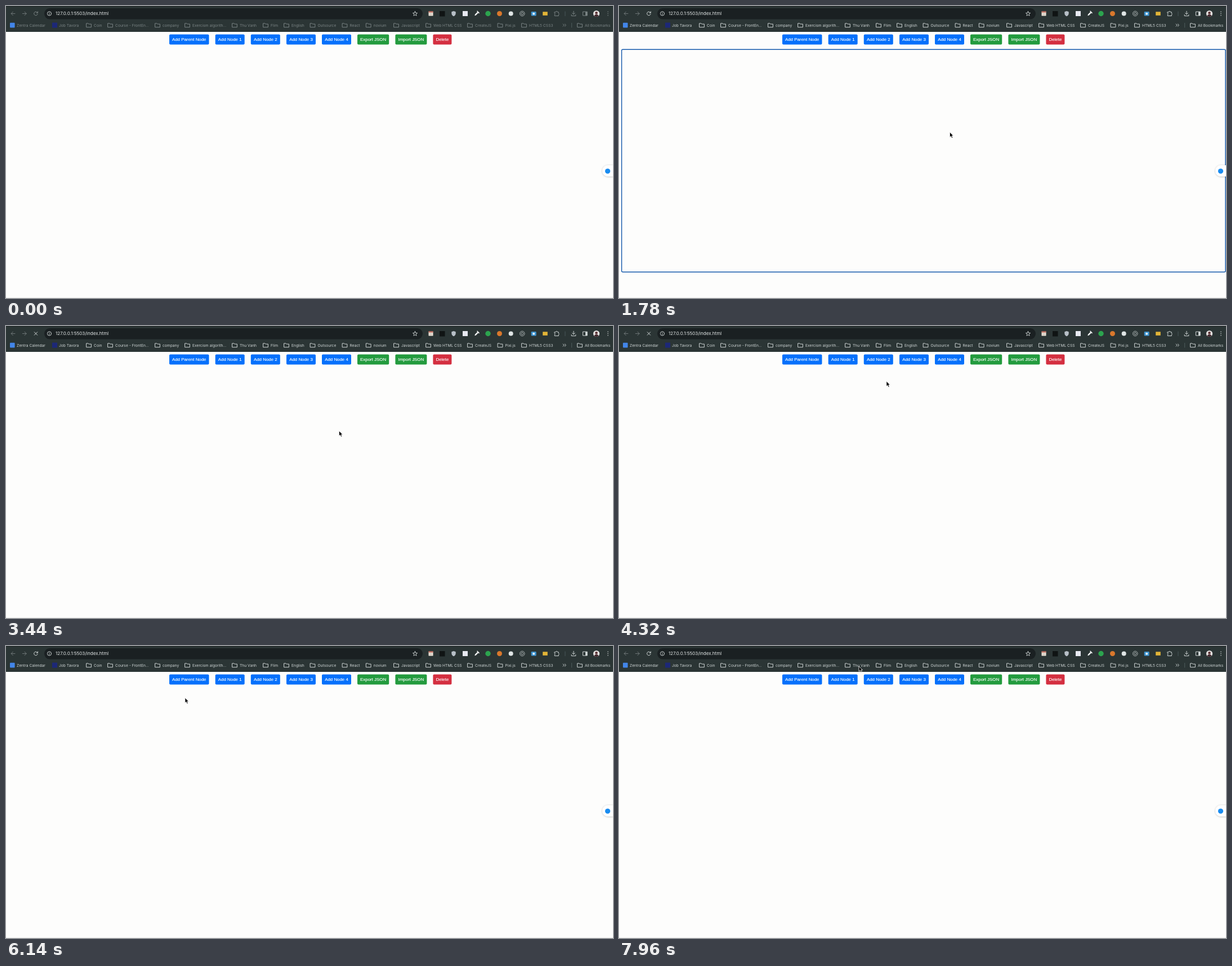
An HTML page for the animation above (8 s loop, 1078 by 519 pixels).

```html
<!DOCTYPE html>
<html lang="en">
<head>
<meta charset="utf-8">
<title>Node editor in a browser</title>
<style>
  html, body { margin: 0; width: 100%; height: 100%; overflow: hidden; background: #fdfdfc; }
  svg { display: block; width: 100%; height: 100%; }
  .ui { font-family: Inter, Roboto, sans-serif; }
  .marks text { font-size: 6.7px; fill: currentColor; }
  .line { fill: none; stroke: currentColor; stroke-width: 1; stroke-linecap: round; stroke-linejoin: round; }
  .btn text { font: 7.9px "Liberation Sans", Arial, sans-serif; fill: #fff; stroke: #fff; stroke-width: .15; text-anchor: middle; }
</style>
</head>
<body>
<svg viewBox="0 0 1078 519" preserveAspectRatio="none">
  <defs>
    <filter id="soft" x="-40%" y="-40%" width="180%" height="180%">
      <feDropShadow dx="0" dy="0.5" stdDeviation="1.6" flood-color="#000" flood-opacity=".28"/>
    </filter>
    <clipPath id="face"><circle cx="1048.5" cy="13.5" r="5.6"/></clipPath>
  </defs>

  <rect width="1078" height="519" fill="#fdfdfc"/>
  <rect y="518" width="1078" height="1" fill="#f0f0f0"/>
  <rect id="focus" x="4.7" y="77.2" width="1072.4" height="395.6" rx="2" fill="none" stroke="#1459ab" stroke-width="1.4"/>
  <g id="buttons" class="btn"></g>

  <g id="widget">
    <path d="M1078 283H1069a10 10 0 0 0 0 20H1078Z" fill="#fff" filter="url(#soft)"/>
    <circle cx="1068.5" cy="293.5" r="4.6" fill="#1a8cf0"/>
  </g>

  <rect width="1078" height="46" fill="#2b3535"/>
  <rect width="1078" height="1" fill="#1c2323"/>
  <rect x="68" y="4" width="672" height="19.5" rx="9.7" fill="#1a2022"/>

  <g class="line" color="#6f7778">
    <path d="M16 13.5H9.3M12.3 10.3L9.1 13.5L12.3 16.7"/>
    <path d="M29.3 13.5H36M33 10.3L36.2 13.5L33 16.7"/>
  </g>

  <g class="line" color="#d3d8d8">
    <circle cx="77" cy="13.5" r="3.6" stroke-width=".9"/>
    <path d="M77 13.3V15.3M77 11.7V11.8" stroke-width=".9"/>
    <path id="star" stroke-width=".9"/>
  </g>
  <text class="ui" x="88" y="16.4" font-size="8" fill="#e3e7e7">127.0.0.1:5503/index.html</text>

  <g id="extensions">
    <rect x="750.5" y="9.5" width="8" height="8" rx=".6" fill="#eee7dc"/>
    <rect x="750.5" y="9.5" width="8" height="2" fill="#b9584a"/>
    <path d="M752 13.5H757M752 15.5H757" stroke="#b3aaa0" stroke-width=".7"/>
    <rect x="770" y="9" width="9.5" height="9.5" fill="#101414"/>
    <path d="M795 9L798.7 10.3V13.5Q798.4 16.8 795 18.2Q791.6 16.8 791.3 13.5V10.3Z" fill="#b8c0c8"/>
    <rect x="811" y="9" width="9" height="9" fill="#e8e9f2"/>
    <path d="M832.3 17.2L833 14.8L837.4 10.4L839.1 12.1L834.7 16.5Z" fill="#f3f5f5"/>
    <path d="M837 9.4L840 12.4" stroke="#f3f5f5" stroke-width="1.5" stroke-linecap="round"/>
    <circle cx="856" cy="13.5" r="4.7" fill="#2ca44e"/>
    <circle cx="876.5" cy="13.5" r="4.5" fill="#d9782c"/>
    <circle cx="896.7" cy="13.5" r="4" fill="#dfe4e4"/>
    <g fill="none" stroke="#b9c0c0" stroke-width=".9">
      <circle cx="916.8" cy="13.5" r="4.3"/><circle cx="916.8" cy="13.5" r="2.1"/>
    </g>
    <rect x="932.7" y="10" width="9" height="7.5" rx="1" fill="#3f94cf"/>
    <circle cx="937.2" cy="13.7" r="2" fill="#f1f6fa"/>
    <rect x="953.2" y="10.3" width="8.6" height="6.5" fill="#e2b437"/>
  </g>
  <path d="M993 9.5V18" stroke="#526062" stroke-width=".8"/>
  <g clip-path="url(#face)">
    <rect x="1042" y="7" width="13" height="13" fill="#e6e3e2"/>
    <circle cx="1048.5" cy="12.2" r="2.3" fill="#5c3234"/>
    <path d="M1044.4 20Q1044.6 14.8 1048.5 14.8Q1052.4 14.8 1052.6 20Z" fill="#452a30"/>
  </g>

  <g id="chrome">
    <g class="line">
      <g id="reload">
        <path d="M55.8 11.7A3.3 3.3 0 1 0 56.2 14.3"/><path d="M56.4 9.9V12.2H54.1"/>
      </g>
      <path id="stop" d="M50.3 10.8L55.7 16.2M55.7 10.8L50.3 16.2"/>
      <path d="M974.3 10.8H976.5A1.4 1.4 0 0 1 979.3 10.8H981.3V13A1.3 1.3 0 0 1 981.3 15.5V17.5H974.3V15.3A1.3 1.3 0 0 0 974.3 12.8Z"/>
      <path d="M1008 9.2V14.7M1005.6 12.5L1008 14.9L1010.4 12.5M1004.2 15.5V17.6H1011.8V15.5"/>
      <path d="M1024.8 10.2H1032.2V17H1024.8Z"/>
      <path d="M989.2 32L991.3 34.1L989.2 36.2M992.4 32L994.5 34.1L992.4 36.2"/>
    </g>
    <g fill="currentColor">
      <rect x="1029" y="10.2" width="3.2" height="6.8"/>
      <circle cx="1069" cy="10.3" r=".8"/><circle cx="1069" cy="13.5" r=".8"/><circle cx="1069" cy="16.7" r=".8"/>
    </g>
    <g id="marks" class="ui marks"></g>
  </g>
  <rect x="7" y="29.8" width="8.6" height="8.6" rx="1" fill="#4285e8"/>
  <rect x="82" y="29.6" width="9" height="9" fill="#1d2878"/>
  <path d="M1004.7 30V38.5" stroke="#596566" stroke-width=".8"/>

  <path id="cursor" d="M0 0V9.2L2.1 7.3L3.6 10.7L5.3 10L3.8 6.7H6.5Z" fill="#000" stroke="#fff" stroke-width=".8" stroke-linejoin="round"/>
</svg>
<script>
const LOOP = 8000;
const $ = id => document.getElementById(id);

function add(parent, tag, attrs, text) {
  const el = document.createElementNS("http://www.w3.org/2000/svg", tag);
  for (const key in attrs) el.setAttribute(key, attrs[key]);
  if (text) el.textContent = text;
  parent.appendChild(el);
}

const BLUE = "#0570fb", GREEN = "#239b3e", RED = "#d42f40";
[
  ["Add Parent Node", 290, 70.5, BLUE], ["Add Node 1", 371.7, 52, BLUE],
  ["Add Node 2", 434.8, 52, BLUE], ["Add Node 3", 498, 52, BLUE],
  ["Add Node 4", 561, 52, BLUE], ["Export JSON", 624, 56.2, GREEN],
  ["Import JSON", 691.4, 56, GREEN], ["Delete", 758.4, 33, RED]
].forEach(([label, x, width, fill]) => {
  add($("buttons"), "rect", { x, y: 50.6, width, height: 17.8, rx: 2, fill });
  add($("buttons"), "text", { x: x + width / 2, y: 62 }, label);
});

// Bookmarks: label, text position, and whether a folder precedes it
[
  ["Zentra Calendar", 19, 0], ["Job Tavora", 94, 0], ["Coin", 156, 1],
  ["Course - FrontEn...", 194, 1], ["company", 278, 1], ["Exercism algorith...", 331, 1],
  ["Thu Vanh", 415, 1], ["Flim", 470, 1], ["English", 507, 1], ["Outsource", 553.5, 1],
  ["React", 610.5, 1], ["novium", 652.7, 1], ["Javascript", 702, 1], ["Web HTML CSS", 759, 1],
  ["CreateJS", 833, 1], ["Pixi.js", 886.5, 1], ["HTML5 CSS3", 929, 1], ["All Bookmarks", 1028, 1]
].forEach(([label, x, folder]) => {
  const left = x - 13;
  if (folder) add($("marks"), "path", {
    class: "line", d: `M${left} 30.9H${left + 3}L${left + 4.2} 32.1H${left + 8.4}V37.7H${left}Z`
  });
  add($("marks"), "text", { x, y: 36.5 }, label);
});

$("star").setAttribute("d", "M" + Array.from({ length: 10 }, (_, i) => {
  const a = i * Math.PI / 5 - Math.PI / 2, r = i % 2 ? 1.9 : 4.3;
  return `${(726.5 + r * Math.cos(a)).toFixed(2)} ${(13.8 + r * Math.sin(a)).toFixed(2)}`;
}).join("L") + "Z");

// Pointer path: time, x, y
const path = [
  [60, 628, 519], [260, 612, 430], [400, 612, 430], [1000, 585.5, 225.5], [1220, 585.5, 225.5],
  [1940, 588, 223.7], [2880, 588.5, 223.5], [3440, 591.5, 186.5], [3720, 574, 142],
  [4460, 452, 88], [5300, 398.5, 75.5], [5400, 398.5, 75.5], [6140, 318, 92],
  [6800, 284, 95.2], [7080, 284, 95.2], [7920, 426, 36], [8000, 426, 36]
];

function pointerAt(t) {
  const i = Math.max(1, path.findIndex(p => p[0] >= t));
  const [t0, x0, y0] = path[i - 1], [t1, x1, y1] = path[i];
  const k = Math.max(0, (t - t0) / (t1 - t0));
  return [x0 + (x1 - x0) * k, y0 + (y1 - y0) * k];
}

const between = (t, from, to) => t >= from && t < to;
const show = (id, on) => $(id).setAttribute("visibility", on ? "visible" : "hidden");

function draw(t) {
  const loading = between(t, 2200, 4900);
  $("chrome").setAttribute("color", t < 100 ? "#7b8485" : "#d0d6d6");
  show("reload", !loading);
  show("stop", loading);
  show("focus", between(t, 600, 2500));
  show("widget", !between(t, 2500, 4900));
  show("cursor", t >= 60);
  $("cursor").setAttribute("transform", `translate(${pointerAt(t)})`);
}

const start = performance.now();
function tick() {
  draw((performance.now() - start) % LOOP);
  requestAnimationFrame(tick);
}
tick();
</script>
</body>
</html>
```
